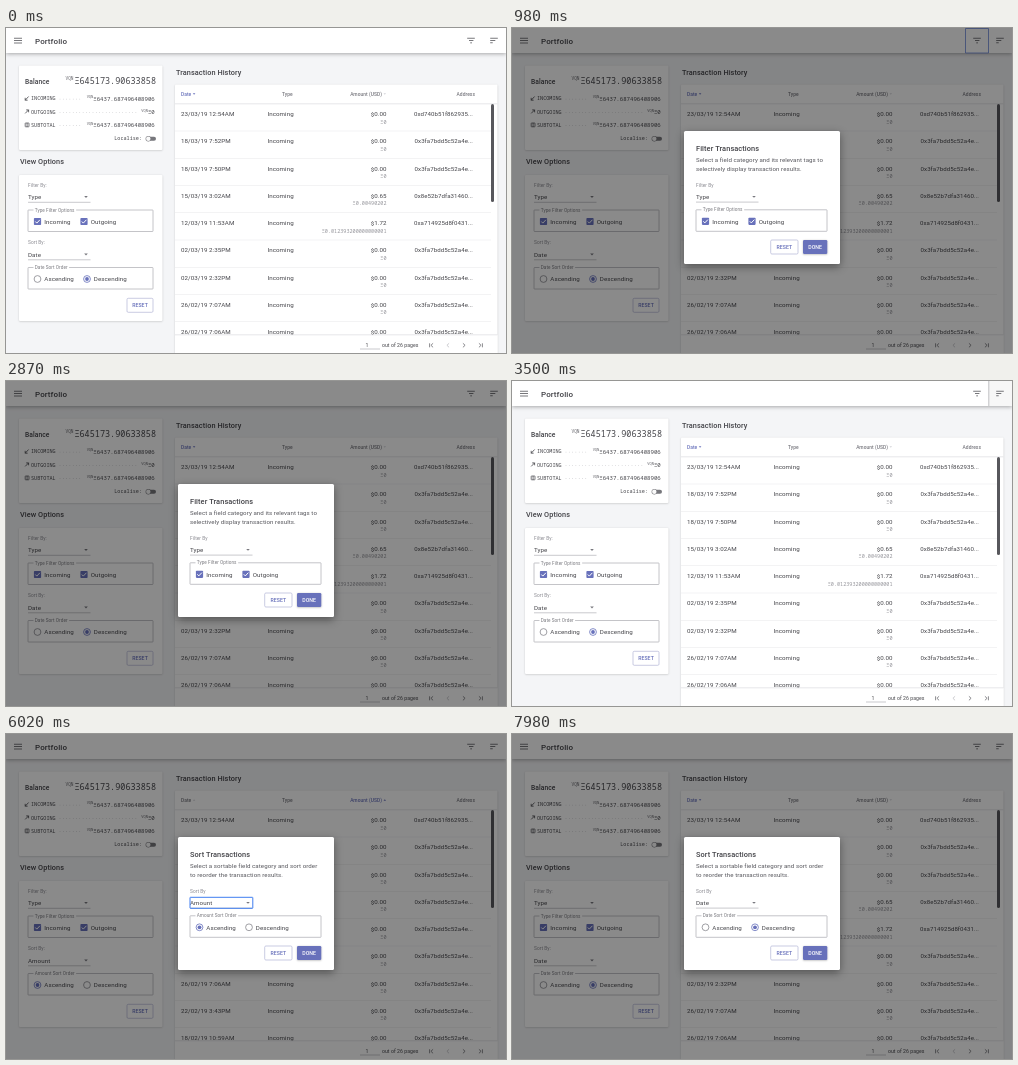
Write an HTML page with a canvas that moves like this. It is 500x325 px and loops after 8 s.

```html
<!DOCTYPE html>
<html lang="en">
<head>
<meta charset="utf-8">
<title>Portfolio</title>
<style>
  html, body { margin: 0; width: 100%; height: 100%; overflow: hidden; background: #f4f5f7; }
  canvas { display: block; width: 500px; height: 325px; }
</style>
</head>
<body>
<canvas id="stage"></canvas>
<script>
const W = 500, H = 325, LOOP = 8000;
const SANS = 'Roboto, sans-serif', MONO = '"Noto Sans Mono", monospace';
const INK = '#434348', GRAY = '#8b8b92', LINE = '#a4a4ab', MAIN = '#6871bb', FOCUS = '#3f7df0';
const UNIT = 'VQN';

const canvas = document.getElementById('stage');
const ctx = canvas.getContext('2d');
const dpr = window.devicePixelRatio || 1;
canvas.width = W * dpr;
canvas.height = H * dpr;

// Click times in ms
const T = {
  filterHover: 350, filterOpen: 640, filterBlur: 1240,
  incOff: 1330, outOff: 1720, incOn: 2420, outOn: 2720, filterDone: 3050,
  sortHover: 3380, sortOpen: 4210, sortBlur: 4800,
  ascending: 5000, menuA: 5280, amount: 5640, menuB: 6520, date: 6900, descending: 7400
};

const row = (date, hash, usd = '0.00', eth = '0') => ({ date, hash, usd, eth });
const A = '0x3fa7bdd5c52a4e', B = '0x9d41b7fe630825';
const latest = [
  row('23/03/19 12:54AM', '0xd740b51f862935'),
  row('18/03/19 7:52PM', A),
  row('18/03/19 7:50PM', A),
  row('15/03/19 3:02AM', '0x8e52b7dfa31460', '0.65', '0.00490202'),
  row('12/03/19 11:53AM', '0xa714925d8f0431', '1.72', '0.012393200000000001'),
  row('02/03/19 2:35PM', A),
  row('02/03/19 2:32PM', A),
  row('26/02/19 7:07AM', A),
  row('26/02/19 7:06AM', A)
];
const cheapest = latest.filter(r => r.eth === '0')
  .concat(row('22/02/19 3:43PM', A), row('18/02/19 10:59AM', A));
const oldest = Array.from({ length: 9 }, (_, i) =>
  row(`${11 + i * 2}/06/18 ${i % 8 + 2}:${17 + i * 4}${i % 3 ? 'PM' : 'AM'}`, i % 3 ? A : B));

const within = (t, a, b) => t >= a && t < b;
const clamp = v => Math.max(0, Math.min(1, v));
const easeOut = v => 1 - (1 - clamp(v)) ** 3;

function stateAt(t) {
  const field = within(t, T.amount, T.date) ? 'Amount' : 'Date';
  const asc = within(t, T.ascending, T.descending);
  const incoming = !within(t, T.incOff, T.incOn);
  return {
    t, field, asc, incoming,
    outgoing: !within(t, T.outOff, T.outOn),
    rows: !incoming ? [] : field === 'Amount' ? cheapest : asc ? oldest : latest,
    filterShow: easeOut((t - T.filterOpen) / 225) * (1 - easeOut((t - T.filterDone) / 195)),
    sortShow: easeOut((t - T.sortOpen) / 225),
    menu: within(t, T.menuA, T.amount) ? t - T.menuA : within(t, T.menuB, T.date) ? t - T.menuB : -1,
    selectFocus: within(t, T.menuA, T.descending)
  };
}

// y is the vertical centre of the capitals
function text(s, x, y, size = 6.2, { color = INK, align = 'left', weight = 400, font = SANS } = {}) {
  ctx.font = `${weight} ${size}px ${font}`;
  ctx.letterSpacing = font === SANS ? `${size * 0.01}px` : '0px';
  ctx.fillStyle = color;
  ctx.textAlign = align;
  ctx.fillText(s, x, y + size * 0.355);
  return ctx.measureText(s).width;
}

function box(x, y, w, h, fill, r = 0) {
  ctx.fillStyle = fill;
  ctx.beginPath();
  ctx.roundRect(x, y, w, h, r);
  ctx.fill();
}

function frame(x, y, w, h, color, r = 0, lw = 0.7) {
  ctx.strokeStyle = color;
  ctx.lineWidth = lw;
  ctx.beginPath();
  ctx.roundRect(x, y, w, h, r);
  ctx.stroke();
}

function path(points, color, lw = 0.8, { fill = false, close = false } = {}) {
  ctx.beginPath();
  points.forEach(([x, y], i) => i ? ctx.lineTo(x, y) : ctx.moveTo(x, y));
  if (close) ctx.closePath();
  if (fill) {
    ctx.fillStyle = color;
    ctx.fill();
  } else {
    ctx.strokeStyle = color;
    ctx.lineWidth = lw;
    ctx.stroke();
  }
}

function triangle(x, y, r, dir, color) {
  path([[x - r, y - dir * r / 2], [x + r, y - dir * r / 2], [x, y + dir * r / 2]], color, 0, { fill: true });
}

function dot(x, y, r, fill) {
  ctx.fillStyle = fill;
  ctx.beginPath();
  ctx.arc(x, y, r, 0, 7);
  ctx.fill();
}

function card(x, y, w, h, blur = 2, alpha = 0.2, r = 1) {
  ctx.save();
  ctx.shadowColor = `rgba(0,0,0,${alpha})`;
  ctx.shadowBlur = blur * dpr;
  ctx.shadowOffsetY = blur * 0.3 * dpr;
  box(x, y, w, h, '#fff', r);
  ctx.restore();
}

function checkbox(x, y, on) {
  if (!on) return frame(x - 3.1, y - 3.1, 6.2, 6.2, '#88888e', 0.6, 0.75);
  box(x - 3.6, y - 3.6, 7.2, 7.2, MAIN, 0.8);
  path([[x - 2.2, y], [x - 0.7, y + 1.6], [x + 2.4, y - 1.7]], '#fff', 1);
}

function radio(x, y, on) {
  ctx.strokeStyle = on ? MAIN : '#88888e';
  ctx.lineWidth = 0.8;
  ctx.beginPath();
  ctx.arc(x, y, 3.4, 0, 7);
  ctx.stroke();
  if (on) dot(x, y, 1.9, MAIN);
}

// Select with a group of two options below it
function fieldGroup(x, y, w, label, value, legend, mark, options) {
  text(label, x, y, 4.8, { color: GRAY });
  text(value, x, y + 12);
  path([[x, y + 17.3], [x + 62.5, y + 17.3]], LINE, 0.6);
  triangle(x + 58, y + 12, 1.8, 1, '#77777d');
  const top = y + 25;
  frame(x, top, w, 21.5, LINE, 0.5, 0.65);
  ctx.font = `400 4.7px ${SANS}`;
  box(x + 5.5, top - 2, ctx.measureText(legend).width + 2.5, 4, '#fff');
  text(legend, x + 6.7, top, 4.7, { color: '#7b7b81' });
  for (const [dx, name, on] of options) {
    mark(x + dx, y + 36.5, on);
    text(name, x + dx + 6.8, y + 36.5);
  }
}

const filterGroup = (s, x, y, w, label) => fieldGroup(x, y, w, label, 'Type', 'Type Filter Options', checkbox,
  [[9.5, 'Incoming', s.incoming], [56, 'Outgoing', s.outgoing]]);

const sortGroup = (s, x, y, w, label) => fieldGroup(x, y, w, label, s.field, `${s.field} Sort Order`, radio,
  [[9.5, 'Ascending', s.asc], [59, 'Descending', !s.asc]]);

function button(x, y, w, h, label, filled) {
  if (filled) {
    card(x, y, w, h, 2, 0.3, 1.2);
    box(x, y, w, h, MAIN, 1.2);
  } else {
    frame(x, y, w, h, '#b3b6d6', 1.2, 0.7);
  }
  text(label, x + w / 2, y + h / 2, 5.2, { color: filled ? '#fff' : MAIN, align: 'center', weight: 500 });
}

function header(s) {
  const { t } = s, icon = '#55555a', ring = '#6a86d8';
  card(0, -4, W, 29, 4, 0.32, 0);
  for (const dy of [-2.4, 0, 2.4]) box(8, 12.2 + dy, 8, 0.8, icon);
  text('Portfolio', 29, 12.7, 8, { weight: 500 });
  if (within(t, T.filterHover, T.filterOpen)) box(453.5, 0, 23.5, 25, 'rgba(0,0,0,.04)');
  if (within(t, T.sortHover, T.sortOpen)) {
    box(477, 0, 23, 25, 'rgba(0,0,0,.03)');
    box(476.5, 0, 0.7, 25, '#a5a5aa');
  }
  if (within(t, T.filterOpen, T.filterBlur)) frame(453.5, 0.5, 23, 24.5, ring, 0, 0.8);
  if (within(t, T.sortOpen, T.sortBlur)) frame(476.5, 0.5, 23, 24.5, ring, 0, 0.8);
  [[461.2, 7.6], [463, 4.4], [464.2, 1.8]].forEach(([x, w], i) => box(x, 9.8 + i * 2.3, w, 0.8, icon));
  [7.6, 5.1, 2.5].forEach((w, i) => box(484.2, 9.8 + i * 2.3, w, 0.8, icon));
}

function balanceLine(y, name, value) {
  const w = text(value, 148.7, y, 5.7, { font: MONO, align: 'right' });
  text(UNIT, 148.7 - w, y - 1.5, 3.7, { font: MONO, align: 'right', color: '#66666c' });
  text(name, 25, y, 5.15, { font: MONO });
  for (let x = 54; x < 138 - w; x += 3.3) dot(x, y + 0.6, 0.35, '#a2a2a8');
}

function balance() {
  card(13, 37.5, 143.5, 84.5);
  text('Balance', 19, 53.7, 6.7, { weight: 500 });
  text('Ξ645173.90633858', 150, 53, 8.5, { font: MONO, align: 'right', weight: 300 });
  text(UNIT, 67.5, 50, 4.4, { font: MONO, align: 'right', color: '#66666c' });
  balanceLine(70.5, 'INCOMING', 'Ξ6437.687496408906');
  balanceLine(83.7, 'OUTGOING', 'Ξ0');
  balanceLine(96.8, 'SUBTOTAL', 'Ξ6437.687496408906');
  path([[22.6, 68.5], [19.2, 72.2]], INK);
  path([[19.2, 69.8], [19.2, 72.2], [21.6, 72.2]], INK);
  path([[19.2, 85.4], [22.6, 81.9]], INK);
  path([[20.2, 81.9], [22.6, 81.9], [22.6, 84.3]], INK);
  frame(19.2, 95, 3.8, 3.8, INK, 0.4);
  path([[21.1, 95], [21.1, 98.8]], INK, 0.7);
  text('Localise:', 136, 110.5, 5.15, { font: MONO, align: 'right' });
  box(140, 108.7, 10, 4, '#77777c', 2);
  dot(142.3, 110.7, 2.7, '#77777c');
  dot(142.3, 110.7, 2.2, '#fafafa');
}

function options(s) {
  text('View Options', 14, 133.5, 7.3, { weight: 500 });
  card(13, 147, 143.5, 146);
  filterGroup(s, 22, 157, 125, 'Filter By:');
  sortGroup(s, 22, 214.5, 125, 'Sort By:');
  button(121, 270.3, 26, 14, 'RESET');
}

function columnHead(name, x, align, active, up) {
  const w = text(name, x, 66, 4.9, { align, weight: 500, color: active ? MAIN : '#77777e' });
  const ax = (align === 'right' ? x : x + w) + 2.8;
  triangle(ax, 66, 1.3, up ? -1 : 1, active ? MAIN : '#d3d3d8');
}

// Ballot sheet over an open tray
function trayIcon(x, y, size) {
  ctx.save();
  ctx.translate(x - size / 2, y - size / 2);
  ctx.scale(size / 24, size / 24);
  path([[18.4, 8], [12, 14.3], [7.1, 9.4], [13.5, 3]], '#1c1c1e', 2, { close: true });
  path([[6.4, 14], [4, 16.4], [4, 21], [20, 21], [20, 16.4], [17.6, 14]], '#1c1c1e', 2);
  path([[4, 18], [20, 18]], '#1c1c1e', 2);
  ctx.restore();
}

function emptyState() {
  trayIcon(330, 165.5, 30);
  text('No Transactions Found', 330, 192, 6, { align: 'center', weight: 500 });
  text('You do not have any historical transactions in this filter.', 330, 203.3, 5.2,
    { align: 'center', color: '#66666c' });
  box(315.5, 216, 28.5, 14, MAIN, 7);
  text('Reload', 330, 223, 5.5, { align: 'center', color: '#fff', weight: 500 });
}

function pager(empty) {
  box(169, 307, 322.5, 18, '#fff');
  box(169, 306.6, 322.5, 0.7, '#dedee2');
  text('1', 361, 317.3, 5.2, { align: 'center' });
  path([[354, 321], [374, 321]], LINE, 0.6);
  text(`out of ${empty ? 1 : 26} pages`, 376, 317.3, 5.15);
  const on = '#66666b', off = '#bdbdc2', next = empty ? off : on;
  const chevron = (x, dir, bar, color) => {
    path([[x + dir, 315.3], [x - dir, 317.3], [x + dir, 319.3]], color, 0.75);
    if (bar) path([[x - dir * 2.2, 315.3], [x - dir * 2.2, 319.3]], color, 0.75);
  };
  chevron(426, 1.1, true, on);
  chevron(442, 1.1, false, off);
  chevron(458, -1.1, false, next);
  chevron(474, -1.1, true, on);
}

function table(s) {
  text('Transaction History', 170, 44, 7.3, { weight: 500 });
  card(169, 56.5, 322.5, 275);
  const empty = !s.rows.length;
  columnHead('Date', 175, 'left', s.field === 'Date', s.asc);
  text('Type', 276, 66, 4.9, { weight: 500, color: '#77777e' });
  columnHead('Amount (USD)', 376, 'right', s.field === 'Amount', s.asc);
  text('Address', 469, 66, 4.9, { align: 'right', weight: 500, color: '#77777e' });
  box(169, 75.6, 322.5, 0.6, '#dedee2');
  if (empty) emptyState();
  s.rows.forEach((r, i) => {
    const y = 86 + i * 27.25;
    text(r.date, 175, y);
    text('Incoming', 261.5, y);
    text('$' + r.usd, 380.5, y, 6.2, { align: 'right' });
    text('Ξ' + r.eth, 380.5, y + 7.7, 5.15, { align: 'right', font: MONO, color: '#94949a' });
    text(r.hash + '...', 467, y, 6.1, { align: 'right' });
    box(169, y + 16.8, 316, 0.5, '#e7e7ea');
  });
  if (!empty) box(485, 76, 3, 98, '#57575c', 1.5);
  pager(empty);
}

function menu(s) {
  const names = ['Date', 'Type', 'Amount', 'Address'];
  const at = names.indexOf(s.field), y = 161.8 - at * 14.4;
  ctx.globalAlpha = easeOut(s.menu / 200);
  card(178, y - 3.2, 72, names.length * 14.4 + 6.4, 6, 0.35, 1.5);
  box(178, y + at * 14.4, 72, 14.4, '#ebebee');
  names.forEach((n, i) => text(n, 184, y + 7.2 + i * 14.4));
  ctx.globalAlpha = 1;
}

function dialog(s, show, title, lines, group, label) {
  if (show <= 0) return;
  ctx.globalAlpha = show;
  box(0, 0, W, H, 'rgba(0,0,0,.46)');
  card(172, 103, 156, 133, 9, 0.4, 1.5);
  text(title, 184, 120.3, 7.4, { weight: 500 });
  lines.forEach((l, i) => text(l, 184, 131.7 + i * 9, 6.15, { color: '#55555b' }));
  group(s, 184, 156.8, 131, label);
  button(258.7, 212, 27.3, 14, 'RESET');
  button(291, 212, 24.3, 14, 'DONE', true);
  ctx.globalAlpha = 1;
}

function draw(t) {
  const s = stateAt(t);
  ctx.setTransform(dpr, 0, 0, dpr, 0, 0);
  box(0, 0, W, H, '#f4f5f7');
  balance();
  options(s);
  table(s);
  header(s);
  dialog(s, s.filterShow, 'Filter Transactions',
    ['Select a field category and its relevant tags to', 'selectively display transaction results.'],
    filterGroup, 'Filter By');
  dialog(s, s.sortShow, 'Sort Transactions',
    ['Select a sortable field category and sort order', 'to reorder the transaction results.'],
    sortGroup, 'Sort By');
  if (s.selectFocus) frame(184, 163.3, 62.8, 11, FOCUS, 0.4, 1);
  if (s.menu >= 0) menu(s);
}

const start = performance.now();
function tick() {
  draw((performance.now() - start) % LOOP);
  requestAnimationFrame(tick);
}
tick();
</script>
</body>
</html>
```
